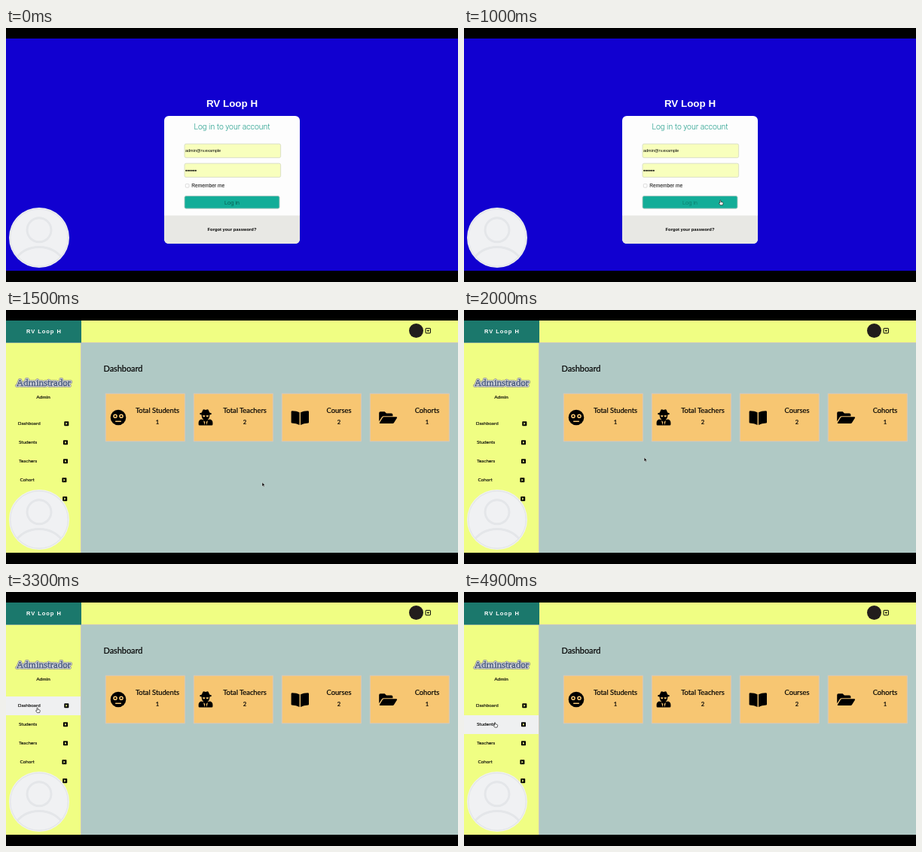
Animation, 600 px wide and 338 px high, one loop 5 s. Source, as an HTML page:

```html
<!DOCTYPE html>
<html lang="en">
<head>
<meta charset="utf-8">
<title>Login to dashboard</title>
<style>
  html, body { margin: 0; width: 100%; height: 100%; overflow: hidden; background: #000; }
  svg { display: block; width: 100vw; height: 100vh; }
  .sans { font-family: "Liberation Sans", Arial, sans-serif; }
  .light { font-family: Roboto, "Liberation Sans", sans-serif; font-weight: 300; }
  .lato { font-family: Lato, sans-serif; stroke: #000; stroke-width: .2; }
  .mid { text-anchor: middle; }
  .bold { font-weight: 700; }
  .badge { font: 13px "Liberation Serif", serif; text-anchor: middle; stroke-linejoin: round; }
</style>
</head>
<body>
<svg viewBox="0 0 600 338" preserveAspectRatio="none">
  <defs>
    <clipPath id="disc"><circle cx="44" cy="279" r="39"/></clipPath>
    <g id="go">
      <rect x="-3" y="-3" width="6" height="6" rx=".7"/>
      <path d="M-1 -1.7L1.3 0L-1 1.7Z" fill="#f0fe83"/>
    </g>
  </defs>
  <rect width="600" height="338"/>

  <g id="login">
    <rect y="14" width="600" height="309" fill="#1100d0"/>
    <text class="sans bold mid" x="300" y="105" font-size="13.4" fill="#fff">RV Loop H</text>
    <rect x="210" y="117" width="180" height="170" rx="6" fill="#fdfdfd"/>
    <path d="M210 249.5H390V281a6 6 0 0 1-6 6H216a6 6 0 0 1-6-6Z" fill="#e8e8e4"/>
    <text class="light mid" x="300" y="134.8" font-size="10.4" fill="#159884">Log in to your account</text>
    <g fill="#f8ffbd" stroke="#d3d8c0" stroke-width=".8">
      <rect x="237" y="154.2" width="127.6" height="18.4" rx="2"/>
      <rect x="237" y="180.2" width="127.6" height="18.4" rx="2"/>
    </g>
    <text class="sans" x="238" y="165.3" font-size="5.5">admin@rv.example</text>
    <g id="dots"></g>
    <rect x="238.3" y="207.6" width="4.6" height="4.6" rx=".8" fill="#fff" stroke="#c4c4c4" stroke-width=".6"/>
    <text class="sans" x="246.3" y="212" font-size="6.65">Remember me</text>
    <rect x="237" y="223.6" width="126" height="16.6" rx="2" fill="#12ad98" stroke="#b3cbc5" stroke-width=".9"/>
    <text id="submit" class="light mid" x="300" y="234.8" font-size="7.5">Log in</text>
    <text class="sans bold mid" x="300" y="270.3" font-size="5.82">Forgot your password?</text>
  </g>

  <g id="app">
    <rect y="14" width="600" height="309" fill="#b0c9c5"/>
    <rect y="14" width="99.5" height="309" fill="#f0fe83"/>
    <rect x="99" y="14" width="501" height="29.5" fill="#f0fe83"/>
    <path d="M0 43.5H600M99.5 43.5V323" stroke="#cdc9bd" fill="none"/>
    <rect y="14" width="100" height="29.5" fill="#1b786c"/>
    <text class="sans bold" x="27" y="31.4" font-size="7.5" letter-spacing=".95" fill="#fff">RV Loop H</text>
    <circle cx="544.5" cy="27.5" r="9.5" fill="#221d1c"/>
    <g class="badge">
      <text x="50" y="101.3" fill="none" stroke="#77777c" stroke-width="3.6">Adminstrador</text>
      <text x="50" y="101.3" fill="none" stroke="#dfe2e6" stroke-width="2.4">Adminstrador</text>
      <text x="50" y="101.3" fill="#5f79a8" stroke="#34405c" stroke-width=".45">Adminstrador</text>
    </g>

    <g id="content">
      <rect x="557" y="24.4" width="6.4" height="6.4" rx=".6" fill="none" stroke="#000"/>
      <path d="M558.5 26.8H562L560.2 28.9Z"/>
      <text class="lato bold mid" x="49.5" y="118.4" font-size="6.4" stroke="none" style="stroke-width:0">Admin</text>
      <rect id="hover" width="99" height="25" fill="#eff0f1"/>
      <g id="menu"></g>
      <text class="lato" x="129.5" y="81.6" font-size="10.9">Dashboard</text>
      <g id="cards"></g>

      <circle cx="149" cy="143" r="10.3"/>
      <g fill="#f7c672">
        <circle cx="145" cy="141.3" r="2.8"/><circle cx="153" cy="141.3" r="2.8"/>
        <rect x="145" y="147.6" width="8" height="1.3" rx=".6"/>
      </g>
      <circle cx="145" cy="141.3" r="1.2"/><circle cx="153" cy="141.3" r="1.2"/>

      <path d="M259.8 136.6L261.3 133Q262 131.8 263.4 132.5Q265 133.3 266.6 132.5Q268 131.8 268.7 133L270.2 136.6Q273 137.2 273 138Q273 139 270.3 139.5V141Q270 144.6 267.6 146L271.2 145.4Q274.4 146.7 274.4 150V152.2Q274.4 153.6 273 153.6H257Q255.6 153.6 255.6 152.2V150Q255.6 146.7 258.8 145.4L262.4 146Q260 144.6 259.7 141V139.5Q257 139 257 138Q257 137.2 259.8 136.6Z"/>
      <path d="M261 140.3H264.4L263.8 142.3H261.7ZM265.6 140.3H269L268.3 142.3H266.2ZM262.2 147L264.3 149L263.4 153ZM267.8 147L265.7 149L266.6 153Z" fill="#f7c672"/>

      <path d="M378.6 135.4Q378.6 134.2 380 134.2Q386 134.4 389.6 136.3V153Q385.4 150.8 379.6 150.6Q378.6 150.5 378.6 149.5ZM402 135.4Q402 134.2 400.6 134.2Q394.6 134.4 391 136.3V153Q395.2 150.8 401 150.6Q402 150.5 402 149.5Z"/>

      <path d="M495.2 148.3V137Q495.2 135.2 497 135.2H502.6L505 137.6H511.6Q513.4 137.6 513.4 139.4V141.2H501.4Q499.8 141.2 498.9 142.6Z"/>
      <path d="M500 143.2Q500.5 142.3 501.6 142.3H518Q519.6 142.3 518.9 143.7L515 150Q514.4 151 513.2 151H496.8Q495.4 151 496 149.8Z"/>
    </g>
  </g>

  <g id="avatar">
    <circle cx="44" cy="279" r="40" fill="#f0f1f3"/>
    <g fill="none" stroke="#e4e6e9" clip-path="url(#disc)">
      <circle cx="44" cy="279" r="38.8" stroke-width="2.4"/>
      <circle cx="44" cy="268.8" r="16" stroke-width="3"/>
      <path d="M10 311Q22 291.5 44 291.5T78 311" stroke-width="3"/>
    </g>
  </g>

  <g id="cursor">
    <path id="arrow" d="M0 0V5.2L1.3 4.1L2.1 6L3 5.6L2.2 3.8H3.8Z" stroke="#fff" stroke-width=".4"/>
    <path id="hand" d="M-.6 .4Q0 -.4 .6 .4V2.3L3 2.9Q3.9 3.2 3.7 4.2L3 6.6H-.2L-2 4.2Q-2 3.4 -1.2 3.6L-.6 4Z" fill="#fff" stroke="#222" stroke-width=".7" stroke-linejoin="round"/>
  </g>
</svg>

<script>
const LOOP = 5000, STEP = 100;
const $ = id => document.getElementById(id);
const show = (id, on) => $(id).setAttribute("display", on ? "inline" : "none");

$("dots").innerHTML = Array.from({ length: 6 }, (_, i) =>
  `<circle cx="${239.3 + i * 2.5}" cy="189.8" r="1.05"/>`).join("");

const rows = [["Dashboard", 15.7, 80.3], ["Students", 17, 79], ["Teachers", 17, 79], ["Cohort", 18.5, 77.4], ["", 20, 78.2]];
$("menu").innerHTML = rows.map(([name, x, icon], i) => {
  const y = 151.3 + i * 25;
  return `<text class="lato" x="${x}" y="${y + 1.8}" font-size="6.3" style="stroke-width:.1">${name}</text>
    <use href="#go" x="${icon}" y="${y}"/>`;
}).join("");

const cards = [["Total Students", 1, 201], ["Total Teachers", 2, 317], ["Courses", 2, 442], ["Cohorts", 1, 559]];
$("cards").innerHTML = cards.map(([name, count, x], i) =>
  `<rect x="${132.3 + i * 117}" y="111.3" width="105" height="63.4" fill="#f7c672" stroke="#dcc7b4"/>
   <text class="lato mid" x="${x}" y="137.4" font-size="9.3">${name}</text>
   <text class="lato mid" x="${x}" y="152.4" font-size="7.6">${count}</text>`).join("");

// Pointer keys: time, x, y
const path = [
  [300, 386, 296], [700, 340.5, 229], [1600, 340, 229.5], [2500, 98.3, 150],
  [2900, 44, 151], [3600, 40, 156], [4200, 39, 161.5], [4500, 41, 172], [4900, 41, 173.5]
];
const ease = p => p * p * (3 - 2 * p);

function pointer(t) {
  let i = 0;
  while (i < path.length - 2 && t >= path[i + 1][0]) i++;
  const [t0, x0, y0] = path[i], [t1, x1, y1] = path[i + 1];
  const p = ease(Math.min(1, Math.max(0, (t - t0) / (t1 - t0))));
  return [x0 + (x1 - x0) * p, y0 + (y1 - y0) * p];
}

function draw(time) {
  const t = Math.floor((time % LOOP) / STEP) * STEP;
  const inApp = t >= 1200, loaded = t >= 1300;
  const [x, y] = pointer(t);
  show("login", !inApp);
  show("app", inApp);
  show("content", loaded);
  show("avatar", !inApp || loaded);
  $("submit").setAttribute("fill", t >= 800 && !inApp ? "#08695d" : "#063a34");

  show("hover", t >= 2500);
  $("hover").setAttribute("y", t < 4300 ? 139 : 164);

  const overButton = !inApp && x < 363 && y > 223 && y < 241;
  const hand = overButton || t > 2500;
  show("cursor", t >= 300);
  show("hand", hand);
  show("arrow", !hand);
  $("cursor").setAttribute("transform", `translate(${x} ${y})`);
}

const start = performance.now();
function tick() {
  draw(performance.now() - start);
  requestAnimationFrame(tick);
}
tick();
</script>
</body>
</html>
```
